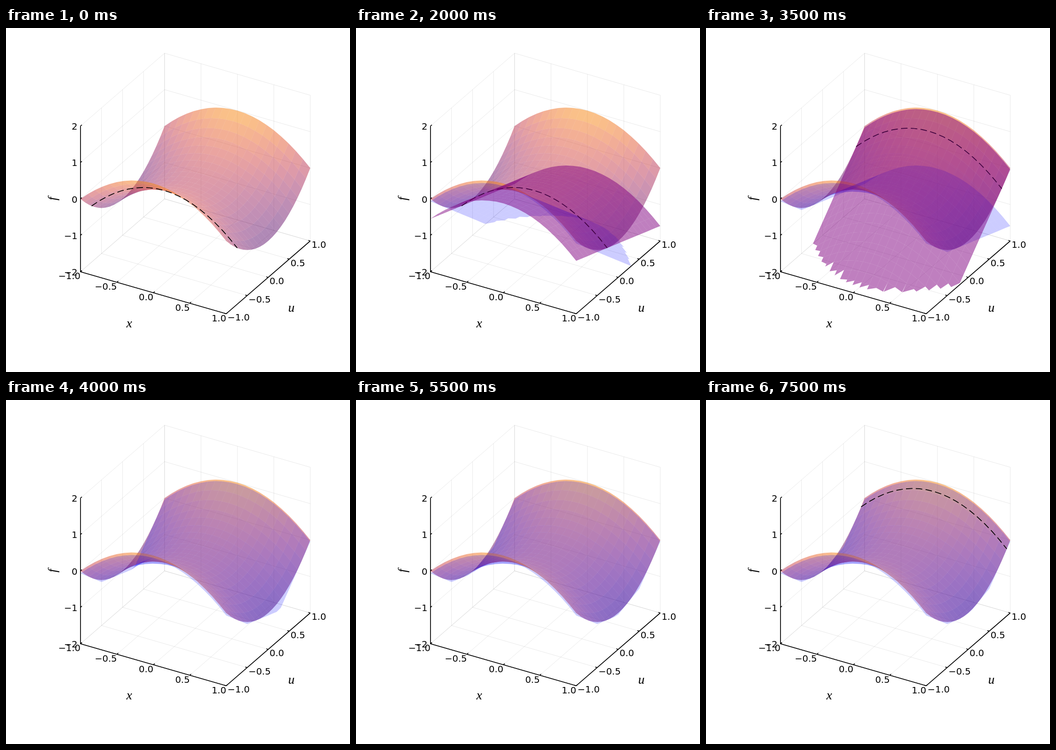
Animation of 748x748 px, one loop 8000 ms. Source, as an HTML page with a canvas:

```html
<!DOCTYPE html>
<html lang="en">
<head>
<meta charset="utf-8">
<title>Cutting planes under a saddle</title>
<style>
html, body { margin: 0; width: 100%; height: 100%; overflow: hidden; background: #fff; }
canvas { display: block; width: 748px; height: 748px; }
</style>
</head>
<body>
<canvas id="stage" width="748" height="748"></canvas>
<script>
const ctx = document.getElementById('stage').getContext('2d');
const STEP = 500, STEPS = 16, N = 20, FLOOR = -2;
const trials = [-0.737, -0.261, 0.798, 0.207, -0.102, 0.917];

// inferno colours from 0.25 to 0.75 in steps of 0.05
const ramp = [
  [87, 16, 110], [106, 23, 110], [127, 30, 108], [147, 38, 103], [168, 46, 95], [188, 55, 84],
  [205, 67, 71], [221, 81, 58], [233, 99, 41], [243, 120, 25], [249, 142, 9]
];

const grid = i => -1 + 2 * i / N;
const project = ([x, u, f]) => [
  162 + 158.4 * (x + 1) + 91.4 * (u + 1),
  530 + 45.7 * (x + 1) - 79.2 * (u + 1) - 79.2 * (f + 2)
];
const saddle = (x, u) => u * u - x * x;
const cut = p => (x, u) => 2 * p * u - p * p - x * x;
const envelope = ps => (x, u) => Math.max(...ps.map(p => cut(p)(x, u)));

function heat(f) {
  const s = Math.min(9.999, Math.max(0, ((f + 2) / 4 - 0.25) * 20));
  const i = Math.floor(s), k = s - i;
  const c = ramp[i].map((v, j) => Math.round(v + (ramp[i + 1][j] - v) * k));
  return `rgba(${c},0.5)`;
}

function path(points) {
  ctx.beginPath();
  points.forEach((p, i) => {
    const [a, b] = project(p);
    i ? ctx.lineTo(a, b) : ctx.moveTo(a, b);
  });
}

function line(points, style, width) {
  path(points);
  ctx.strokeStyle = style;
  ctx.lineWidth = width;
  ctx.stroke();
}

// Keeps only the exit points at the floor, which gives the saw-toothed rim.
function clipFloor(face) {
  const out = [];
  face.forEach((a, i) => {
    const b = face[(i + 1) % face.length];
    if (b[2] >= FLOOR) {
      out.push(b);
    } else if (a[2] >= FLOOR) {
      const k = (FLOOR - a[2]) / (b[2] - a[2]);
      out.push(a.map((v, j) => v + (b[j] - v) * k));
    }
  });
  return out;
}

function surface(fn, fill) {
  const at = (i, j) => [grid(i), grid(j), fn(grid(i), grid(j))];
  for (let j = N - 1; j >= 0; j--) {
    for (let i = 0; i < N; i++) {
      const quad = [at(i, j), at(i + 1, j), at(i + 1, j + 1), at(i, j + 1)];
      const face = clipFloor(quad);
      if (face.length < 3) continue;
      path(face);
      ctx.closePath();
      ctx.fillStyle = typeof fill === 'string' ? fill : fill(quad.reduce((s, p) => s + p[2] / 4, 0));
      ctx.fill();
    }
  }
}

function trialCurve(u) {
  const points = Array.from({ length: N + 1 }, (_, i) => [grid(i), u, saddle(grid(i), u)]);
  ctx.setLineDash([14.2, 7.1]);
  line(points, '#000', 1.7);
  ctx.setLineDash([]);
}

function tick(p, dx, dy) {
  const [a, b] = project(p);
  ctx.beginPath();
  ctx.moveTo(a, b);
  ctx.lineTo(a + dx, b + dy);
  ctx.stroke();
}

function label(text, p, dx, dy, align) {
  const [a, b] = project(p);
  ctx.textAlign = align;
  ctx.fillText(text, a + dx, b + dy);
}

function axes() {
  const faint = 'rgba(0,0,0,0.1)';
  for (let k = -2; k <= 2; k++) {
    const h = k / 2;
    line([[h, -1, -2], [h, 1, -2], [h, 1, 2]], faint, 0.9);
    line([[1, h, -2], [-1, h, -2], [-1, h, 2]], faint, 0.9);
    line([[-1, -1, k], [-1, 1, k], [1, 1, k]], faint, 0.9);
  }
  line([[-1, -1, 2], [-1, -1, -2], [1, -1, -2], [1, 1, -2]], '#000', 1.7);

  ctx.fillStyle = '#000';
  ctx.font = '19.9px "DejaVu Sans", sans-serif';
  ctx.textBaseline = 'alphabetic';
  for (let k = -2; k <= 2; k++) {
    const h = k / 2;
    const name = h.toFixed(1).replace('-', '\u2212');
    tick([h, -1, -2], 3, -2.6);
    tick([1, h, -2], -4.2, -1.2);
    tick([-1, -1, k], 3, -2.6);
    label(name, [h, -1, -2], 0, 16.3, 'right');
    label(name, [1, h, -2], 2.8, 14.9, 'left');
    label(String(k).replace('-', '\u2212'), [-1, -1, k], -6.5, 8, 'right');
  }

  ctx.font = 'italic 28px "Liberation Serif", serif';
  ctx.textAlign = 'center';
  ctx.fillText('x', 268, 651);
  ctx.fillText('u', 620.5, 617);
  ctx.save();
  ctx.translate(110, 371);
  ctx.rotate(-Math.PI / 2);
  ctx.fillText('f', 0, 0);
  ctx.restore();
}

// Each round: show the trial curve, add its cut, merge the cut into the bound.
function draw(step) {
  const round = Math.floor(step / 3), phase = step % 3;
  const known = trials.slice(0, round + (phase === 2 ? 1 : 0));
  ctx.fillStyle = '#fff';
  ctx.fillRect(0, 0, 748, 748);
  axes();
  surface(saddle, heat);
  if (known.length) surface(envelope(known), 'rgba(0,0,255,0.2)');
  if (phase < 2) trialCurve(trials[round]);
  if (phase === 1) surface(cut(trials[round]), 'rgba(128,0,128,0.5)');
}

let shown = -1, start = null;
function tickFrame(now) {
  if (start === null) start = now;
  const step = Math.floor((now - start) / STEP) % STEPS;
  if (step !== shown) draw(shown = step);
  requestAnimationFrame(tickFrame);
}
draw(shown = 0);
requestAnimationFrame(tickFrame);
</script>
</body>
</html>
```
